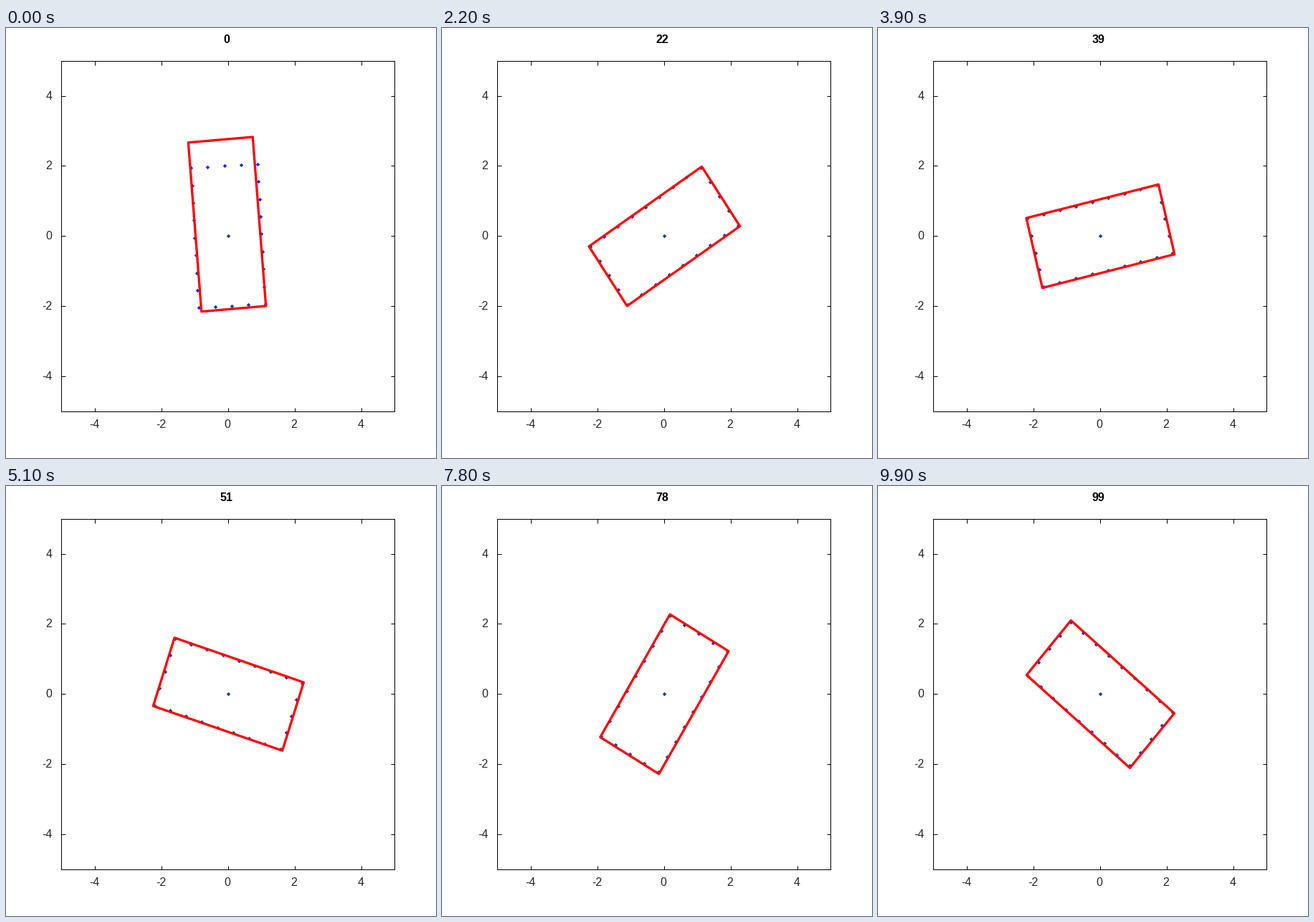
Animation of 600x600 px, one loop 10000 ms. Source, as a matplotlib script:

```python
import numpy as np
import matplotlib.pyplot as plt
from matplotlib.animation import FuncAnimation

SIZE, DPI, STEPS = 600, 100, 100
LEFT, RIGHT, TOP, BOTTOM = 77.4, 542.4, 45.6, 534.6
PX = 72 / DPI
BLUE, TEAL = "#2222ff", "#0a3fa0"

plt.rcParams["font.family"] = "Liberation Sans"

fig = plt.figure(figsize=(SIZE / DPI, SIZE / DPI), dpi=DPI, facecolor="white")
ax = fig.add_axes([LEFT / SIZE, 1 - BOTTOM / SIZE,
                   (RIGHT - LEFT) / SIZE, (BOTTOM - TOP) / SIZE])
ax.set(xlim=(-5, 5), ylim=(-5, 5))
TICKS = range(-4, 5, 2)
ax.set_xticks(TICKS)
ax.set_yticks(TICKS)
ax.tick_params(direction="in", length=5.5 * PX, width=PX, top=True, right=True,
               labelleft=False, labelbottom=False)
for spine in ax.spines.values():
    spine.set_linewidth(PX)


def label(x, y, text, **style):
    """Text with its baseline at pixel (x, y), counted from the top left."""
    opts = dict(fontsize=16 * PX, color="#262626", ha="center", va="baseline")
    return fig.text(x / SIZE, 1 - y / SIZE, text, **{**opts, **style})


for v in TICKS:
    label(309 + 46.5 * v, 558.5, str(v))
    label(64.5, 295.2 - 48.9 * v, str(v), ha="right")
title = label(307.7, 21, "0", weight="bold", color="black")


def outline():
    """Points every half unit around a 4 by 2 rectangle."""
    x, y = np.linspace(-2, 2, 9), np.linspace(-1, 1, 5)[1:-1]
    sides = [(x, 0 * x - 1), (x, 0 * x + 1), (0 * y - 2, y), (0 * y + 2, y)]
    return np.hstack([np.array(s) for s in sides])


def rotate(points, deg):
    c, s = np.cos(np.radians(deg)), np.sin(np.radians(deg))
    return np.array([[c, -s], [s, c]]) @ points


BODY = outline()
CORNERS = np.array([[-1, 1, 1, -1], [-1, -1, 1, 1]]) / 2


def heading(n):
    """Turn rate grows by 0.2 degrees per step."""
    k = n + 1
    return 90 + 3.1 * k + 0.1 * k * k


def estimate(n):
    """Corners of the fitted rectangle, converging from a rough first guess."""
    fade = np.exp(-n / 3)
    length, width = 4.08 + 0.76 * fade, 2.05 - 0.11 * fade
    wobble = 0.05 + 0.6 * np.cos(2 * np.pi * n / 64)
    angle = heading(n) + wobble + 0.85 * fade
    x = 0.01 - 0.04 * fade
    y = -0.008 + 0.34 * np.exp(-n / 5) * np.cos(1.6 * n)
    box = CORNERS * np.array([[length], [width]])
    return rotate(box, angle) + np.array([[x], [y]])


def dots(color):
    return ax.plot([], [], "D", ms=3.9 * PX, mew=0, color=color, zorder=2)[0]


blue, teal = dots(BLUE), dots(TEAL)
fit = plt.Polygon(np.zeros((4, 2)), closed=True, fill=False, edgecolor="red",
                  linewidth=3.3 * PX, joinstyle="round", zorder=3)
ax.add_patch(fit)


def update(n):
    body = rotate(BODY, heading(n))
    dark = np.random.default_rng(n).random(body.shape[1]) < 0.5
    blue.set_data(*body[:, ~dark])
    teal.set_data(*np.hstack([body[:, dark], np.zeros((2, 1))]))
    fit.set_xy(estimate(n).T)
    title.set_text(str(n))
    return blue, teal, fit, title


anim = FuncAnimation(fig, update, frames=STEPS, interval=100,
                     init_func=lambda: update(0), repeat=True, repeat_delay=0)
plt.show()
```
